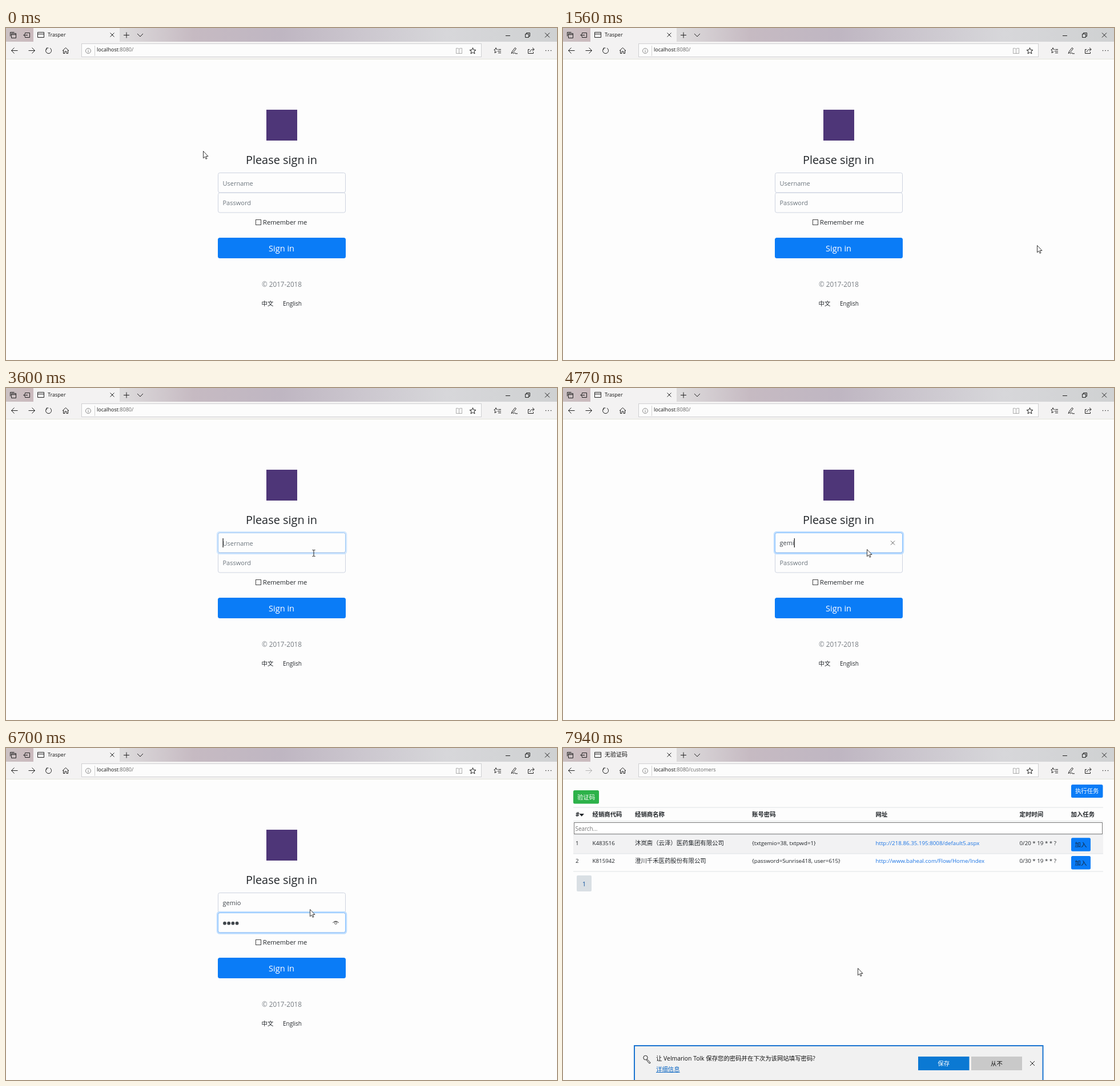
An HTML page for the animation above (8 s loop, 965x581 px).

```html
<!DOCTYPE html>
<html lang="en">
<head>
<meta charset="utf-8">
<title>Sign in</title>
<style>
html, body { margin: 0; width: 100%; height: 100%; overflow: hidden; background: #fdfdfd; }
svg { display: block; width: 965px; height: 581px; }
text { font-family: "Open Sans", "Noto Sans CJK SC", "Noto Sans CJK", sans-serif; white-space: pre; }
.icon { fill: none; stroke: #222; stroke-width: 1; }
.off { opacity: .3; }
</style>
</head>
<body>
<svg id="stage" viewBox="0 0 965 581"></svg>
<script>
const LOOP = 8000;
const text = (x, y, size, s, fill = '#212529', more = '') =>
  `<text x="${x}" y="${y}" font-size="${size}" fill="${fill}" ${more}>${s}</text>`;
const rect = (x, y, w, h, fill, more = '') =>
  `<rect x="${x}" y="${y}" width="${w}" height="${h}" fill="${fill}" ${more}/>`;
const icon = (d, more = '') => `<path class="icon" d="${d}" ${more}/>`;
const group = (id, body) => `<g id="${id}">${body}</g>`;
const mid = 'text-anchor="middle"';

const stops = [[0, '#cbc1c3'], [5, '#cab9bd'], [21, '#dddbdc'], [34, '#c6bac2'],
  [50, '#bfb6c2'], [64, '#cbc6ce'], [80, '#d7d7da'], [100, '#cfd1d2']];

const browser = `
  <defs><linearGradient id="strip">${stops.map(([o, c]) =>
    `<stop offset="${o}%" stop-color="${c}"/>`).join('')}</linearGradient></defs>
  ${rect(0, 0, 965, 24, 'url(#strip)')}
  ${rect(48, 0, 151, 24, '#f3f2f2')}${rect(0, 24, 965, 30, '#f3f2f2')}
  ${rect(0, 54, 965, 1, '#e3e3da')}
  ${rect(132.5, 27.5, 700, 23, '#fcfcfc', 'stroke="#cfcfd2"')}
  ${icon('M7.5 14.5V7.5H14.5M9.5 9.5H17.5V17.5H9.5ZM9.5 11.5H17.5')}
  ${icon('M33.5 10V8.5H41.5V16.5H33.5V15M31 12.5H38M33.5 10L31 12.5 33.5 15')}
  ${icon('M182.5 8.5L189.5 15.5M189.5 8.5L182.5 15.5M206 12.5H216M211 7.5V17.5M230 10L235 15 240 10')}
  ${icon('M875 13.5H883M909.5 10.5H915.5V16.5H909.5ZM911.5 10V8.5H917.5V14.5H916M944 8.5L952 16.5M952 8.5L944 16.5')}
  ${icon('M20.5 39.5H9.5M14.5 34.5L9.5 39.5 14.5 44.5')}
  ${icon('M39.5 39.5H50.5M45.5 34.5L50.5 39.5 45.5 44.5', 'id="forward"')}
  ${icon('M71.5 35.6A5 5 0 1 0 77 35.2M71 38.4V35H74.4', 'id="reload"')}
  ${icon('M70.5 35.5L78.5 43.5M78.5 35.5L70.5 43.5', 'id="halt"')}
  ${icon('M99 39.8L104.5 34.5 110 39.8M100.5 38.5V44.5H103V41H106V44.5H108.5V38.5')}
  <g opacity=".5">${icon('M139.5 40a4.5 4.5 0 1 0 9 0a4.5 4.5 0 1 0 -9 0M144 39V43M144 37V38')}</g>
  ${rect(155, 31, 1, 18, '#d2d2d2')}
  <g opacity=".35">${icon('M793.5 36.5V44.5M793.5 36.5C792 35.3 790 35.3 788.5 35.5V44.5H798.5V35.5C797 35.3 795 35.3 793.5 36.5')}</g>
  ${icon('M817.5 34.5L819 38.3 823 38.5 819.9 41 821 45 817.5 42.7 814 45 815.1 41 812 38.5 816 38.3Z')}
  ${icon('M862 37.5H867M861 40.5H867M862 43.5H867M861 37.5H859.4L858 34.6 856.8 37.6 854.8 38 856.7 40.2 856 43.5 859.5 41.6')}
  <g id="tools">
  ${icon('M885 44.5L886.5 41 891.5 34.5 893.5 36 888.5 42.5 885 44.5M888 45C891 43 892 43 892 44.8H896')}
  ${icon('M917 37.5H914.5V44.5H923.5V42M917.5 42C918 38.5 920 37.5 925 37.5M922 34.5L925.2 37.5 922 40.5')}
  </g>
  ${[945.5, 950, 954.5].map(x => `<circle cx="${x}" cy="39.5" r=".8" fill="#222"/>`).join('')}
  ${icon('M55.5 7.5H66.5V16.5H55.5ZM55.5 10.5H66.5', 'id="tabIcon"')}
  ${group('spinner', '<circle r=".9"/><circle r=".9"/><circle r=".9"/>')}
  ${text(73, 15.3, 9, 'Trasper', '#111', 'id="tabName"')}
  <text x="159" y="41" font-size="9.05" fill="#111">localhost<tspan fill="#666" id="path">:8080/</tspan></text>`;

const field = (y, id) => rect(371.5, y, 223, 34.5, '#fdfdfd', `rx="3" stroke="#cdd3e0" id="${id}"`);
const ring = (id, y, h) => group(id,
  rect(370, y - 1.5, 226, h + 3, 'none', 'rx="4" stroke="#bfdeff" stroke-width="2.4"') +
  rect(371.5, y, 223, h, 'none', 'rx="3" stroke="#80bdff"'));

const login = group('login', `
  ${rect(456, 143, 54, 54, '#4e3678')}
  ${text(482.5, 238, 19.9, 'Please sign in', '#212529', mid)}
  ${field(253.5)}${field(288.5)}
  ${ring('userRing', 253.5, 35)}${ring('passRing', 288.5, 34.5)}
  ${text(379.5, 275.5, 11, 'Username', '#6c757d', 'id="userHint"')}
  ${text(379.5, 310.3, 11, 'Password', '#6c757d', 'id="passHint"')}
  ${text(379.5, 275.3, 11, '', '#40464c', 'id="user"')}
  ${group('dots', [0, 1, 2, 3].map(i =>
    `<circle cx="${383 + 7.2 * i}" cy="306.7" r="2.9" fill="#40464c"/>`).join(''))}
  ${icon('M574 267.5L581 274.5M581 267.5L574 274.5', 'id="clear" opacity=".7"')}
  ${group('eye', icon('M572.5 306C575 302.3 580 302.3 582.5 306') +
    '<circle cx="577.5" cy="306.3" r="2" fill="none" stroke="#555"/>')}
  ${rect(0, 0, 1.2, 16, '#111', 'id="caret"')}
  ${rect(437.5, 335.5, 9, 9, '#fff', 'stroke="#444"')}
  ${text(450, 344, 11.15, 'Remember me')}
  ${rect(369.8, 365.8, 226.4, 38.4, 'none', 'rx="4.5" stroke="#80bdff" stroke-width="2.4" id="goRing"')}
  ${rect(371, 367, 224, 36, '#0a7cf7', 'rx="3.5" id="go"')}
  ${text(482.5, 391, 14.6, 'Sign in', '#fff', mid)}
  ${text(483, 453.3, 11.7, '© 2017-2018', '#777c82', mid)}
  ${text(447.5, 486, 10.4, '中文')}${text(485, 485.7, 9.95, 'English')}`);

const columns = [22, 51.5, 126, 331, 547.5, 799.5];
const row = (y, cells) => cells.map((s, i) =>
  text(columns[i], y, i === 2 ? 10.4 : 9.75, s, i === 4 ? '#1b74e4' : '#212529')).join('') +
  rect(890, y - 12.3, 34, 23.5, '#0a7cf7', 'rx="2.5"') + text(907, y + 3.6, 10.4, '加入', '#12263f', mid);
const heads = ['#', '经销商代码', '经销商名称', '账号密码', '网址', '定时时间', '加入任务'];

const customers = group('customers', `
  ${rect(18, 74, 45, 23.5, '#2db24a', 'rx="2.5"')}${text(40.5, 90, 10.4, '验证码', '#fff', mid)}
  ${rect(890, 64, 55.5, 23, '#0a7cf7', 'rx="2.5"')}${text(917.7, 79.3, 10.4, '执行任务', '#fff', mid)}
  ${rect(18, 152, 928, 33, '#f2f2f3')}
  ${[104, 128, 152, 185, 216].map(y => rect(18, y - .5, 928, 1, '#e0e3e6')).join('')}
  ${heads.map((s, i) => text([...columns, 889.5][i], 120.3, 10.4, s, '#212529', 'font-weight="bold"')).join('')}
  <path d="M28.5 115H37L32.7 119.7Z" fill="#212529"/>
  ${rect(19.5, 130.5, 925, 20, '#fff', 'stroke="#777"')}
  ${text(21.5, 144.8, 9.9, 'Search...', '#757575')}
  ${row(169.5, ['1', 'K483516', '沐岚斋（云泽）医药集团有限公司', '{txtgemio=38, txtpwd=1}',
    'http://218.86.35.195:8008/default5.aspx', '0/20 * 19 * * ?'])}
  ${row(201.3, ['2', 'K815942', '澄川千禾医药股份有限公司', '{password=Sunrise418, user=615}',
    'http://www.baheal.com/Flow/Home/Index', '0/30 * 19 * * ?'])}
  ${rect(24, 223, 26, 28, '#d9dfe4', 'rx="2"')}${text(37, 241.5, 10.5, '1', '#0a4f9e', mid)}`);

const prompt = group('prompt', `
  ${rect(125, 521, 715.5, 80, '#f1f1f1', 'stroke="#1a74d0" stroke-width="2"')}
  <g class="icon"><circle cx="144.5" cy="542" r="3.7"/>
  <path d="M147.2 544.6L152.8 550.2V551.5H150.5L146 545.7"/></g>
  ${text(163, 547.2, 10.4, '让 Velmarion Tolk 保存您的密码并在下次为该网站填写密码?', '#111')}
  ${text(163, 566, 10.4, '详细信息', '#0c66c2', 'text-decoration="underline"')}
  ${rect(622, 540, 89.5, 24, '#0b79d3')}${text(666.7, 556, 10.4, '保存', '#fff', mid)}
  ${rect(715, 540, 89, 24, '#c9c9c9')}${text(759.5, 556, 10.4, '从不', '#111', mid)}
  ${icon('M818 548L826 556M826 548L818 556')}`);

const pointer = group('pointer',
  group('arrow', '<path d="M.5 .5V12.8L3.3 10.2 5.1 14.3 7 13.5 5.2 9.5H9Z" fill="#fff" stroke="#222" stroke-width=".9"/>') +
  group('beam', icon('M4.5 1.5H6.3L7 2.2 7.7 1.5H9.5M7 2V12M4.5 12.5H6.3L7 11.8 7.7 12.5H9.5')));

document.getElementById('stage').innerHTML =
  rect(0, 0, 965, 581, '#fdfdfd') + login + customers + browser + prompt + pointer;
const el = {};
document.querySelectorAll('[id]').forEach(e => el[e.id] = e);

const show = (e, on) => e.style.display = on ? '' : 'none';
const ramp = (t, a, b) => Math.max(0, Math.min(1, (t - a) / (b - a)));
const smooth = k => k * k * (3 - 2 * k);

const FOCUS = 3500, TAB = 5150, CLICK = 7060, NAV = 7150, LOADED = 7820;
const NAME = 'gemio';
const nameKeys = [4270, 4430, 4580, 4740, 4900];
const passKeys = [5430, 5700, 5930, 6270];
const route = [[30, 345, 215], [420, 470, 462], [830, 800, 378], [1400, 830, 380], [1640, 830, 380],
  [2150, 850, 478], [2700, 700, 522], [3150, 625, 400], [3480, 532, 282],
  [6730, 532, 282], [7030, 516, 385], [LOOP, 516, 385]];

function pointerAt(t) {
  const i = Math.max(1, route.findIndex(p => p[0] > t));
  const [a, x, y] = route[i - 1], [b, u, v] = route[i];
  const k = smooth(ramp(t, a, b));
  return [x + (u - x) * k, y + (v - y) * k];
}

function render(t) {
  const typed = nameKeys.filter(k => t >= k).length;
  const secret = passKeys.filter(k => t >= k).length;
  const inUser = t >= FOCUS && t < TAB, inPass = t >= TAB && t < CLICK;
  const loading = t >= NAV && t < LOADED, loaded = t >= LOADED;

  // Form
  el.user.textContent = NAME.slice(0, typed);
  show(el.userHint, !typed);
  show(el.passHint, !secret);
  show(el.clear, inUser && typed);
  show(el.eye, inPass && secret);
  [...el.dots.children].forEach((dot, i) => show(dot, i < secret));
  el.userRing.style.opacity = ramp(t, FOCUS, FOCUS + 150) - ramp(t, TAB, TAB + 150);
  el.passRing.style.opacity = ramp(t, TAB, TAB + 150) - ramp(t, CLICK, CLICK + 150);
  el.goRing.style.opacity = ramp(t, CLICK, CLICK + 150);

  const lastKey = Math.max(...[FOCUS, TAB, ...nameKeys, ...passKeys].filter(k => t >= k));
  show(el.caret, (inUser || inPass) && (t - lastKey) % 860 < 430);
  const offset = inUser ? (typed ? el.user.getComputedTextLength() : 0) : secret * 7.2;
  el.caret.setAttribute('x', 379.5 + offset);
  el.caret.setAttribute('y', inUser ? 263 : 298);

  // Pointer
  const [x, y] = pointerAt(t);
  const beam = t >= 3430 && t < nameKeys[0];
  el.pointer.setAttribute('transform', `translate(${Math.round(x)} ${Math.round(y)})`);
  show(el.beam, beam);
  show(el.arrow, !beam);
  const hover = x > 371 && x < 595 && y > 367 && y < 403;
  el.go.setAttribute('fill', hover ? '#0669d6' : '#0a7cf7');

  // Navigation
  show(el.login, !loaded);
  show(el.customers, loaded);
  show(el.halt, loading);
  show(el.reload, !loading);
  show(el.spinner, loading);
  show(el.tabIcon, !loading);
  el.forward.classList.toggle('off', t >= NAV);
  el.tools.classList.toggle('off', loading);
  el.tabName.textContent = loaded ? '无验证码' : 'Trasper';
  el.tabName.setAttribute('font-size', loaded ? 10 : 9);
  el.path.textContent = t >= NAV ? ':8080/customers' : ':8080/';
  [...el.spinner.children].forEach((dot, i) => {
    const a = (t - 7640) / 160 + 3 - i * .6;
    dot.setAttribute('cx', 60 + 6 * Math.cos(a));
    dot.setAttribute('cy', 12 + 6 * Math.sin(a));
  });
  const rise = 1 - (1 - ramp(t, 7220, 7490)) ** 3;
  show(el.prompt, rise);
  el.prompt.setAttribute('transform', `translate(0 ${62 * (1 - rise)})`);
}

const start = performance.now();
function tick() {
  render((performance.now() - start) % LOOP);
  requestAnimationFrame(tick);
}
tick();
</script>
</body>
</html>
```
